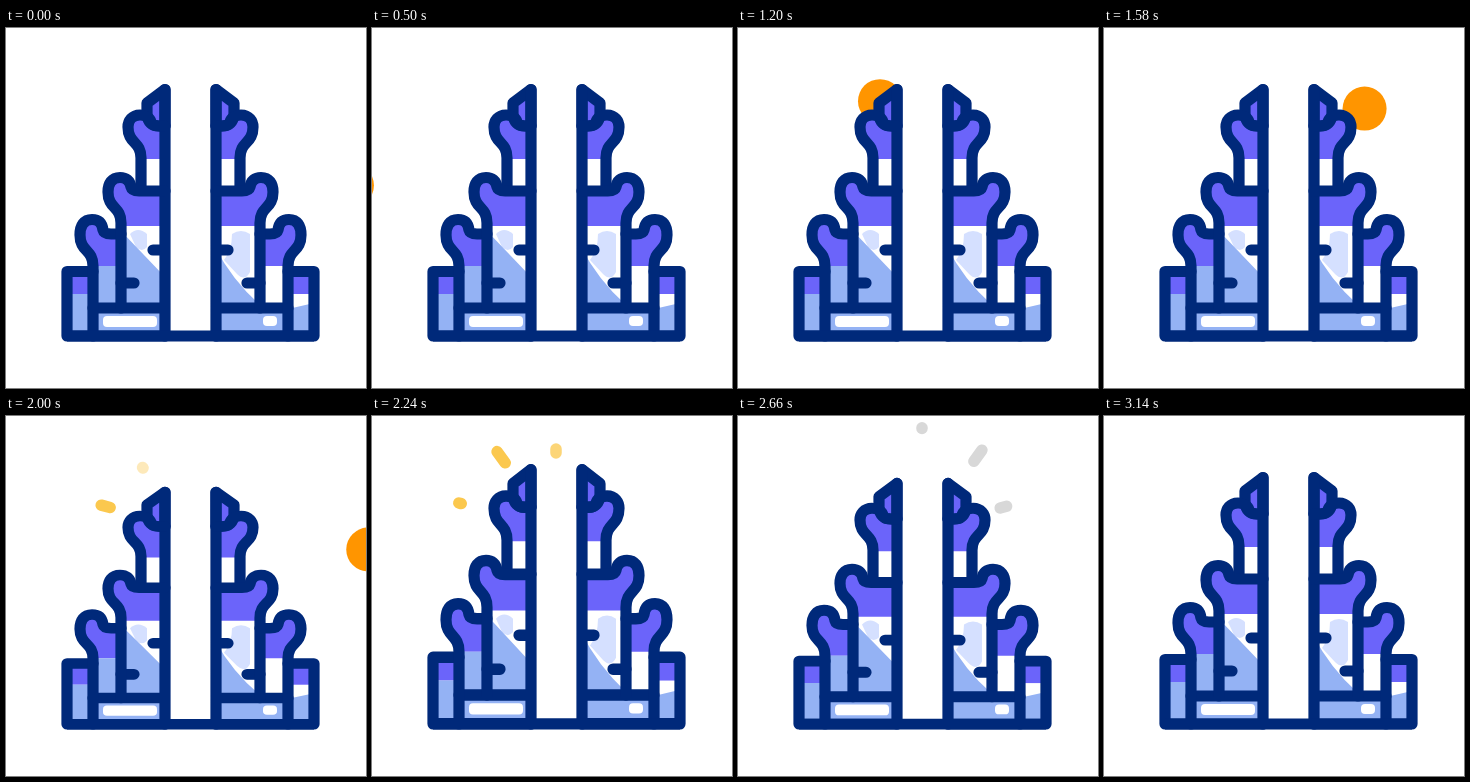
Animation of 360x360 px, one loop 3.3 s. Source, as an HTML page with a canvas:

```html
<!DOCTYPE html>
<html lang="en">
<head>
<meta charset="utf-8">
<title>Temple gate</title>
<style>
html, body { margin: 0; width: 100%; height: 100%; overflow: hidden; background: #fff; }
canvas { display: block; width: 100vmin; height: 100vmin; }
</style>
</head>
<body>
<canvas id="stage" width="360" height="360"></canvas>
<script>
const ctx = document.getElementById('stage').getContext('2d');
const LOOP = 3300, AXIS = 184.5, FLOOR = 313;
const NAVY = '#00297a', PURPLE = '#6b64fa', BLUE = '#94b2f4', PALE = '#d5e0ff', SUN = '#ff9500';

// One side of a tier: a flat ledge, a rounded curl, then a wall.
function curl(x, y, rise, end, bottom) {
  const top = y - rise;
  return `M${end} ${y}H${x + 18}Q${x + 11} ${y} ${x + 10} ${y - 4}` +
    `C${x + 9} ${top + 3} ${x + 5} ${top} ${x - 1} ${top}` +
    `C${x - 9} ${top} ${x - 13} ${top + 6} ${x - 13} ${y + 1}` +
    `C${x - 13} ${y + 18} ${x} ${y + 15} ${x} ${y + 32}V${bottom}`;
}

const blade = new Path2D('M159 61.5L141 75V86Q142 98 153 98H159Z');
const wall = new Path2D('M87 243.5H61V308H159');
const tiers = [
  { line: curl(135, 98, 11, 159, 162), end: 159, bottom: 162, split: 131 },
  { line: curl(87, 206, 14.5, 115, 308), end: 115, bottom: 308, split: 238 },
  { line: curl(115, 163, 13.5, 159, 280), end: 159, bottom: 280, split: 198 }
].map(t => ({
  line: new Path2D(t.line),
  area: new Path2D(`${t.line}H${t.end}Z`),
  split: t.split
}));
const details = new Path2D('M159 61.5V308M87 280H159M159 222H147M115 255H128');

const shadeLeft = new Path2D('M61 266H87V308H61ZM87 238H115V280H87ZM115 203Q138 227 159 249V280H115Z');
const shadeRight = new Path2D('M209 219Q226 252 254 277V280H209ZM282 281L308 275V308H282Z');
const paleLeft = new Path2D('M124 206Q132 198 141 206V219Q136 225 130 219Z');
const paleRight = new Path2D('M226 206Q235 200 244 206V244Q239 254 231 246L218 232Q226 222 226 206Z');

function box(color, x, y, w, h, r = 0) {
  ctx.fillStyle = color;
  ctx.beginPath();
  ctx.roundRect(x, y, w, h, r);
  ctx.fill();
}

function fillPath(color, path) {
  ctx.fillStyle = color;
  ctx.fill(path);
}

function bothSides(draw) {
  draw();
  ctx.save();
  ctx.translate(AXIS * 2, 0);
  ctx.scale(-1, 1);
  draw();
  ctx.restore();
}

function drawFills() {
  box('#fff', 61, 243, 98, 65);
  box(PURPLE, 61, 243, 26, 23);
  fillPath(PURPLE, blade);
  for (const t of tiers) {
    fillPath('#fff', t.area);
    ctx.save();
    ctx.clip(t.area);
    box(PURPLE, 60, 60, 100, t.split - 60);
    ctx.restore();
  }
  box(BLUE, 87, 280, 72, 28);
}

function drawLines() {
  ctx.strokeStyle = NAVY;
  ctx.lineWidth = 11.2;
  [blade, wall, details, ...tiers.map(t => t.line)].forEach(p => ctx.stroke(p));
}

function drawGate(stretch) {
  ctx.save();
  ctx.translate(0, FLOOR);
  ctx.scale(1, stretch);
  ctx.translate(0, -FLOOR);
  bothSides(drawFills);
  fillPath(PALE, paleLeft);
  fillPath(BLUE, shadeLeft);
  fillPath(BLUE, shadeRight);
  fillPath(PALE, paleRight);
  box('#fff', 97, 288, 54, 11, 4);
  box('#fff', 257, 288, 14, 10, 4);
  bothSides(drawLines);
  box(NAVY, 61, 302.5, 247, 11);
  ctx.restore();
}

const clamp = v => Math.min(1, Math.max(0, v));
const ease = v => (1 - Math.cos(Math.PI * clamp(v))) / 2;

const bounce = [[1700, 1], [1980, .941], [2260, 1.032], [2620, .976], [2960, 1]];
function stretchAt(t) {
  let s = 1;
  for (let i = 1; i < bounce.length; i++) {
    const [t0, a] = bounce[i - 1], [t1, b] = bounce[i];
    s += (b - a) * ease((t - t0) / (t1 - t0));
  }
  return s;
}

function drawSun(t) {
  if (t < 440 || t > 2250) return;
  const a = 57.7 * Math.sin((t - 1334) * .00112) * Math.PI / 180;
  ctx.fillStyle = SUN;
  ctx.beginPath();
  ctx.arc(184 + 282 * Math.sin(a), 352 - 282 * Math.cos(a), 22, 0, Math.PI * 2);
  ctx.fill();
}

// Start time, inner point, outer point
const rays = [
  [1775, 106, 92, 87, 87],
  [1965, 137, 52, 121, 30],
  [2135, 184, 37, 184, 12],
  [2365, 231, 52, 247, 30],
  [2495, 262, 92, 281, 87]
];
const RAY_TIME = 560;

function drawRays(t) {
  const fade = clamp((t - 2400) / 200);
  const mix = (a, b) => Math.round(a + (b - a) * fade);
  ctx.strokeStyle = `rgb(${mix(251, 216)},${mix(200, 216)},${mix(78, 216)})`;
  ctx.lineWidth = 11.5;
  for (const [start, x0, y0, x1, y1] of rays) {
    const p = (t - start) / RAY_TIME;
    if (p <= 0 || p >= 1) continue;
    const head = ease(p / .75), tail = ease((p - .25) / .75);
    const at = k => [x0 + (x1 - x0) * k, y0 + (y1 - y0) * k];
    ctx.globalAlpha = clamp(.2 + p * 3);
    ctx.beginPath();
    ctx.moveTo(...at(tail));
    ctx.lineTo(...at(head + .01));
    ctx.stroke();
  }
  ctx.globalAlpha = 1;
}

function frame(now) {
  const t = now % LOOP;
  ctx.fillStyle = '#fff';
  ctx.fillRect(0, 0, 360, 360);
  ctx.lineCap = ctx.lineJoin = 'round';
  drawSun(t);
  drawRays(t);
  drawGate(stretchAt(t));
  requestAnimationFrame(frame);
}
frame(performance.now());
</script>
</body>
</html>
```
